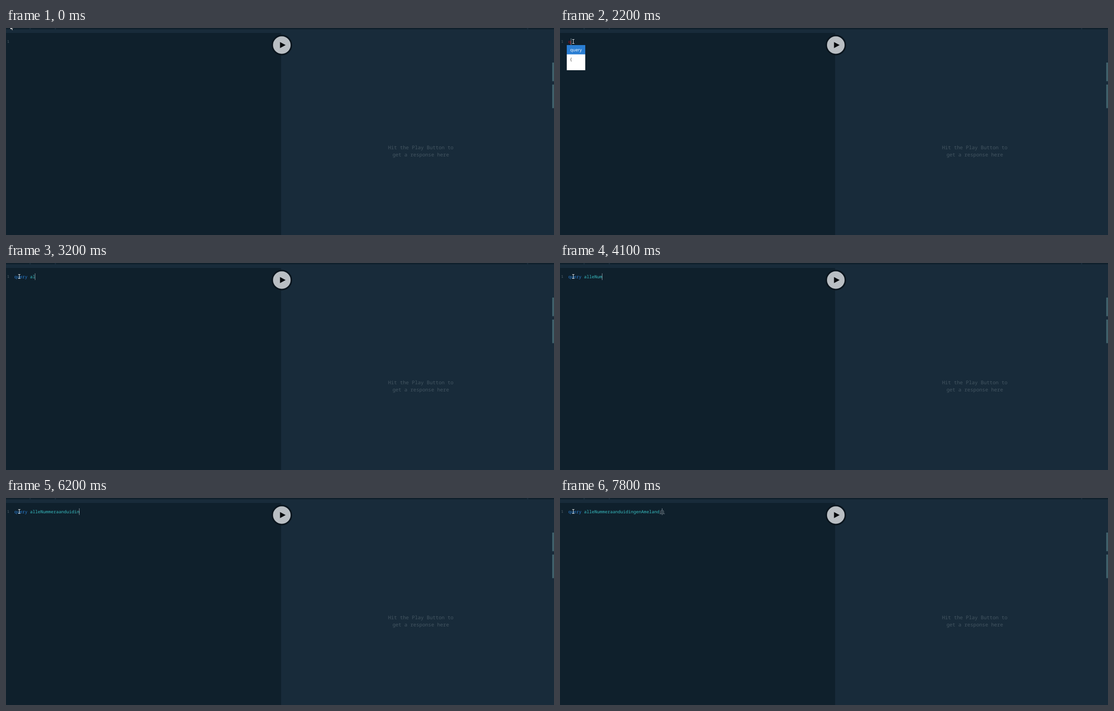
Animation, 1215 px wide and 461 px high, one loop 8000 ms. Source, as an HTML page:

```html
<!DOCTYPE html>
<html lang="en">
<head>
<meta charset="utf-8">
<title>Query editor</title>
<style>
  html, body { margin: 0; width: 100%; height: 100%; overflow: hidden; background: #182b3a; }
  svg { display: block; width: 1215px; height: 461px; }
  text { white-space: pre; text-rendering: geometricPrecision; }
  .mono { font-family: "Noto Sans Mono", "DejaVu Sans Mono", monospace; }
  .code { font-size: 9.625px; }
  .hint { font-size: 11px; fill: #445662; text-anchor: middle; }
  .menu { font: 9.6px "Open Sans", "Noto Sans", sans-serif; }
  .dark { fill: #0f202c; }
</style>
</head>
<body>
<svg viewBox="0 0 1215 461">
  <rect class="dark" y="11" width="610" height="450"/>
  <rect class="dark" width="1215" height="3"/>
  <path d="M53.5 0v3M109.5 0v3M1156.5 0v3" stroke="#182b3a" stroke-width="3"/>
  <path d="M1213 77v41.5M1213 126v52.5" stroke="#3f606b" stroke-width="4"/>

  <circle cx="611.5" cy="38" r="21.2" fill="#b9bec3" stroke="#0a151e" stroke-width="3.4"/>
  <path d="M607.5 31.2 620 38 607.5 44.8Z" fill="#080b0e"/>

  <text class="mono hint" x="919.6" y="270">Hit the Play Button to</text>
  <text class="mono hint" x="919.6" y="285.5">get a response here</text>
  <text class="mono" x="2.6" y="32.5" font-size="8" fill="#5f6e77">1</text>

  <text class="mono code" y="33.5"></text>
  <rect id="caret" y="23" width="1" height="15" fill="#87929a"/>

  <g id="menu" class="menu">
    <rect id="sheet" x="15" y="38" width="41" fill="#fff"/>
    <rect x="15" y="38" width="41" height="20.7" fill="#2a7ed3"/>
    <text x="22.4" y="51.5" fill="#fff">query</text>
    <text id="brace" x="22.4" y="73" fill="#333">{</text>
  </g>

  <path id="arrow" d="M0 0V11.3L2.5 9 4.2 12.8 6 12 4.4 8.3H7.8Z" fill="#fff" stroke="#0a1118" stroke-width=".7"/>
  <g id="beam" fill="none">
    <path id="bar" d="M-2.5-4.5H2.5M0-4.5V4.5M-2.5 4.5H2.5" stroke="#e8ecee"/>
  </g>
</svg>
<script>
const LOOP = 8000, TICK = 100, KEY = 85, LEFT = 18.6, STEP = 5.775;

// Bursts of typing: when the first key falls, and what is typed
const BURSTS = {
  2100: "q", 2400: "uery", 2900: " ", 3100: "alle", 3700: "N", 3900: "u", 4100: "m",
  4230: "mer", 4600: "aan", 5000: "dui", 5900: "di", 6200: "ng", 6415: "en",
  6660: "Amela", 7200: "nd"
};

const $ = s => document.querySelector(s);
const code = $(".code"), caret = $("#caret");
const show = (el, on) => el.setAttribute("visibility", on ? "inherit" : "hidden");
const within = (t, a, b) => t >= a && t < b;

function typedAt(t) {
  return Object.entries(BURSTS)
    .map(([at, keys]) => keys.slice(0, Math.max(0, Math.floor((t - at) / KEY) + 1)))
    .join("");
}

function span(str, col, fill, line = "none") {
  const el = document.createElementNS("http://www.w3.org/2000/svg", "tspan");
  el.textContent = str;
  el.setAttribute("x", LEFT + col * STEP);
  el.setAttribute("fill", fill);
  el.setAttribute("text-decoration", line);
  return el;
}

function drawCode(line, braces) {
  const n = line.length;
  code.replaceChildren(
    span(line.slice(0, 5), 0, n < 5 ? "#c10b10" : "#2a7ed3"),
    span(line.slice(6), 6, "#38bdc1"),
    span(braces, n, "#87929a", "underline")
  );
  caret.setAttribute("x", Math.floor(LEFT + (n + braces.length / 2) * STEP));
}

function drawPointer(t) {
  const k = Math.min(t / 400, 1);
  const overText = k > 0.25;
  for (const id of ["#arrow", "#beam"]) {
    $(id).setAttribute("transform", `translate(${9.3 + 20.2 * k} ${-7.5 + 37.5 * k})`);
    show($(id), (id === "#beam") === overText);
  }
}

function draw(t) {
  const line = typedAt(t);
  drawCode(line, within(t, 1200, 1700) || t >= 7800 ? "{}" : "");
  show(caret, t >= 900 && !within(t, 5800, 5900));

  const two = line.length < 3;
  show($("#menu"), within(t, 2200, 2700));
  show($("#brace"), two);
  $("#sheet").setAttribute("height", two ? 56 : 34);
  drawPointer(t);
}

const start = performance.now();
let last = -1;
function frame() {
  const tick = Math.floor((performance.now() - start) % LOOP / TICK);
  if (tick !== last) draw(tick * TICK);
  last = tick;
  requestAnimationFrame(frame);
}
frame();
</script>
</body>
</html>
```
